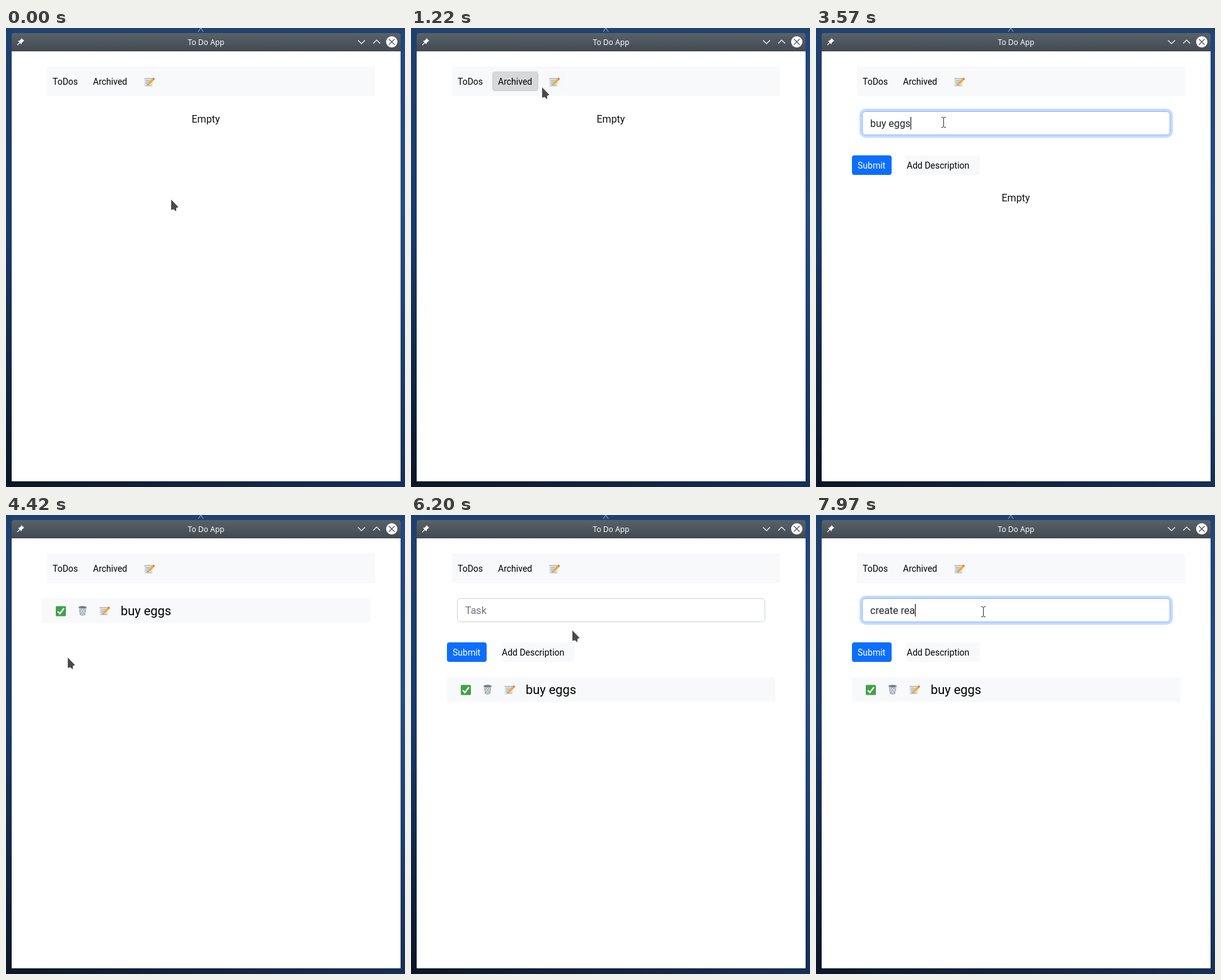
These frames come from a looping animation (633 by 728 pixels, 8 s). An HTML page:

```html
<!DOCTYPE html>
<html lang="en">
<head>
<meta charset="utf-8">
<title>To Do App</title>
<style>
  html, body { margin: 0; width: 100%; height: 100%; overflow: hidden; background: #1d3c68; }
  svg { display: block; }
  text { font: 16px Roboto, sans-serif; fill: #111; white-space: pre; }
  .small { font-size: 14px; fill: #000; }
  .large { font-size: 20px; fill: #000; }
  .title { font: 12px "Noto Sans", sans-serif; fill: #fcfcfc; text-anchor: middle; }
  .line { fill: none; stroke: #fcfcfc; stroke-width: 1.2; }
  .hover { fill: #d3d4d5; stroke: #c6c7c8; }
</style>
</head>
<body>
<svg width="633" height="728" viewBox="0 0 633 728">
  <defs>
    <linearGradient id="desk" x2="0" y2="1">
      <stop stop-color="#20406c"/><stop offset=".45" stop-color="#1a3a68"/><stop offset="1" stop-color="#0b1626"/>
    </linearGradient>
    <linearGradient id="deskRight" x2="0" y2="1">
      <stop stop-color="#21457b"/><stop offset=".4" stop-color="#254b85"/><stop offset="1" stop-color="#172f55"/>
    </linearGradient>
    <linearGradient id="deskBottom">
      <stop stop-color="#0c1828"/><stop offset="1" stop-color="#172f55"/>
    </linearGradient>
    <linearGradient id="bar" x2="0" y2="1">
      <stop stop-color="#596269"/><stop offset="1" stop-color="#424a50"/>
    </linearGradient>
    <g id="memo">
      <path d="M0 1.5H13V15H0z" fill="#dfe3e5"/>
      <path d="M0 1.5H13V3H0z" fill="#b4babd"/>
      <path d="M2 5.5H9M2 8H8M2 10.5H6M2 13H11" stroke="#9aa2a6" stroke-width=".9"/>
      <path d="M5 12.5 6 9 13 2 15.5 4.5 8.5 11.5z" fill="#f9a825"/>
      <path d="M13 2 14.2 .8Q16.5 1.5 16.5 3.5L15.5 4.5z" fill="#e8554d"/>
      <path d="M5 12.5 6 9 8.5 11.5z" fill="#e8bd86"/>
      <path d="M5 12.5 5.4 11 6.5 12z" fill="#444"/>
    </g>
    <g id="check">
      <rect width="16" height="16" rx="1.5" fill="#43a047"/>
      <path d="M3 8.5 6.5 12 13 3.5" fill="none" stroke="#fff" stroke-width="2.2"/>
    </g>
    <g id="trash">
      <path d="M1.5 2.5H13.5L12 14.5Q7.5 17 3 14.5z" fill="#a9b3b8"/>
      <path d="M3 5 10 15M6 4 12 12M12 5 5 15M9 4 3 12" stroke="#e4e9eb" stroke-width=".9"/>
      <ellipse cx="7.5" cy="2.5" rx="6.6" ry="2.2" fill="#6d7a80" stroke="#c5cdd1"/>
    </g>
  </defs>

  <rect width="633" height="728" fill="url(#desk)"/>
  <rect x="9" y="719" width="624" height="9" fill="url(#deskBottom)"/>
  <rect x="626" width="7" height="728" fill="url(#deskRight)"/>
  <rect x="9" width="624" height="8" fill="#21426f"/>
  <path d="M305 6 309 0 313 6" fill="none" stroke="#a9bdd8"/>
  <path d="M9 37V12Q9 8 13 8H622Q626 8 626 12V37z" fill="url(#bar)"/>
  <path d="M9 37H626V719H9z" fill="#fff"/>
  <text class="title" x="317.5" y="27">To Do App</text>
  <path d="M24.5 16 29 20.5 27.5 21 25 23.5 24.5 26 19 20.5 21.5 20 24 17.5z" fill="#fcfcfc"/>
  <path class="line" d="M22 23 18 27M558.5 19.5 564 25 569.5 19.5M582.5 24.5 588 19 593.5 24.5"/>
  <circle cx="612" cy="22" r="9" fill="#fcfcfc"/>
  <path d="M607.5 17.5l9 9M616.5 17.5l-9 9" stroke="#4a5258" stroke-width="1.2"/>

  <path d="M65 61H585.5V108H65z" fill="#f8f9fa"/>
  <rect id="todosHover" class="hover" x="65.5" y="69.5" width="56" height="30" rx="3.5"/>
  <rect id="archivedHover" class="hover" x="129.5" y="69.5" width="72" height="30" rx="3.5"/>
  <rect id="memoHover" class="hover" x="210.5" y="69.5" width="34" height="30" rx="3.5"/>
  <text class="small" x="74" y="90">ToDos</text>
  <text class="small" x="138" y="90">Archived</text>
  <use href="#memo" x="219.5" y="78"/>

  <g id="form">
    <rect id="ring" x="71" y="130" width="493" height="42" rx="8" fill="none" stroke="#0d6efd" stroke-width="4"/>
    <rect id="border" x="73.5" y="132.5" width="488" height="37" rx="5.5" fill="#fff"/>
    <text id="field" x="86" y="157"></text>
    <path id="caret" d="M.5 141V161" stroke="#000"/>
    <rect x="57" y="202" width="63" height="31" rx="4" fill="#0d6efd"/>
    <rect id="submitHover" x="57" y="202" width="63" height="31" rx="4" fill="#0b5ed7"/>
    <text class="small" x="66" y="223" style="fill:#fff">Submit</text>
    <rect x="143" y="202" width="117" height="31" rx="4" fill="#f8f9fa"/>
    <text class="small" x="144" y="223">Add Description</text>
  </g>

  <g id="list">
    <text id="empty" x="294.5" y="150">Empty</text>
    <g id="item">
      <path d="M57 132H578V171H57z" fill="#f8f9fa"/>
      <use href="#check" x="79" y="144.5"/>
      <use href="#trash" x="114" y="144"/>
      <use href="#memo" x="148.5" y="144.5"/>
      <text class="large" x="182" y="159">buy eggs</text>
    </g>
  </g>

  <g id="cursor">
    <path id="arrow" d="M0 0V16.5L4 15.5 8 19V13.5L11.5 12z" fill="#4a4a4a" stroke="#fff" stroke-width="1.4" paint-order="stroke"/>
    <path id="hand" d="M-2 1.5Q-2 0 -.2 0T1.7 1.5V6L9 7.5Q11 8 10.5 10.5L9 15V19.5H0V16.5L-6.5 9.5Q-7.5 7.5 -5 7.3L-2 9z"
      fill="#4a4a4a" stroke="#fff" stroke-width="1.4" paint-order="stroke"/>
    <path id="beam" d="M-3 -7.5H-1L.5 -6.5 2 -7.5H4M.5 -6.5V7.5M-3 8.5H-1L.5 7.5 2 8.5H4" fill="none" stroke="#333"/>
  </g>
</svg>
<script>
const LOOP = 8000;
const $ = id => document.getElementById(id);
const clamp = v => Math.max(0, Math.min(1, v));
const smooth = v => (v = clamp(v), v * v * (3 - 2 * v));
const show = (id, on) => $(id).style.display = on ? '' : 'none';

// Pointer moves: start, end, x, y and an optional control point
const moves = [
  [20, 440, 160, 88, 175, 190],
  [700, 810, 101, 92],
  [960, 1310, 229, 94],
  [1560, 1850, 202, 149],
  [4030, 4300, 98, 226],
  [4580, 4850, 96, 90],
  [4950, 5350, 229, 94],
  [5610, 5940, 256, 183],
  [6200, 6420, 265, 153]
];

// Time spans with the pointer over each control, or with the field in focus
const spans = {
  todosHover: [[800, 1030], [4770, 5030]],
  archivedHover: [[290, 790], [1080, 1190], [5080, 5210]],
  memoHover: [[1210, 1600], [5240, 5660]],
  submitHover: [[4190, 4420]],
  ring: [[1870, 4270], [6460, 8200]]
};

const typing = [
  ['buy eggs', [2360, 2620, 2770, 2860, 2950, 3410, 3490, 3570], 1500],
  ['create rea', [6720, 6890, 7020, 7190, 7290, 7380, 7480, 7710, 7820, 7970], 5610]
];

// Fades in and out over 150 ms
const fade = (id, t) => spans[id].reduce(
  (sum, [on, off]) => sum + smooth((t - on) / 150) - smooth((t - off) / 150), 0);

function pointerAt(t) {
  let x = 262, y = 272;
  for (const [t0, t1, ex, ey, cx = (x + ex) / 2, cy = (y + ey) / 2] of moves) {
    if (t < t0) break;
    const u = smooth((t - t0) / (t1 - t0));
    const bezier = (a, b, c) => a * (1 - u) ** 2 + 2 * b * u * (1 - u) + c * u * u;
    [x, y] = [bezier(x, cx, ex), bezier(y, cy, ey)];
  }
  return [x, y];
}

function drawForm(t) {
  const [word, times] = typing.findLast(entry => t >= entry[2]) || typing[0];
  const text = word.slice(0, times.filter(time => t >= time).length);
  const focus = clamp(fade('ring', t));
  const mix = (a, b) => a + (b - a) * focus;
  const field = $('field');
  field.textContent = text || 'Task';
  field.style.fill = text ? '#212529' : '#6c757d';
  const width = text ? field.getComputedTextLength() : 0;
  $('caret').setAttribute('transform', `translate(${Math.round(86 + width)})`);
  show('caret', focus > 0);
  $('ring').style.opacity = focus * .25;
  $('border').style.stroke = `rgb(${mix(206, 134)},${mix(212, 183)},${mix(218, 254)})`;
}

function drawPointer(t, form) {
  const [x, y] = pointerAt(t);
  const over = (x0, y0, x1, y1) => x >= x0 && x <= x1 && y >= y0 && y <= y1;
  const hand = over(65, 69, 121, 100) || over(129, 69, 202, 100) || over(210, 69, 245, 100)
    || form && over(57, 202, 120, 233);
  const beam = form && over(73, 132, 562, 170);
  show('hand', hand);
  show('beam', beam);
  show('arrow', !hand && !beam);
  $('cursor').setAttribute('transform', `translate(${Math.round(x)} ${Math.round(y)})`);
}

function draw(t) {
  const form = t >= 1500 && t < 4420 || t >= 5610;
  const saved = t >= 4420;
  show('form', form);
  show('empty', !saved);
  show('item', saved);
  $('list').setAttribute('transform', `translate(0 ${form ? 125 : 0})`);
  for (const id of ['todosHover', 'archivedHover', 'memoHover', 'submitHover'])
    $(id).style.opacity = fade(id, t);
  if (form) drawForm(t);
  drawPointer(t, form);
}

const start = performance.now();
function tick() {
  draw((performance.now() - start) % LOOP);
  requestAnimationFrame(tick);
}
tick();
</script>
</body>
</html>
```
